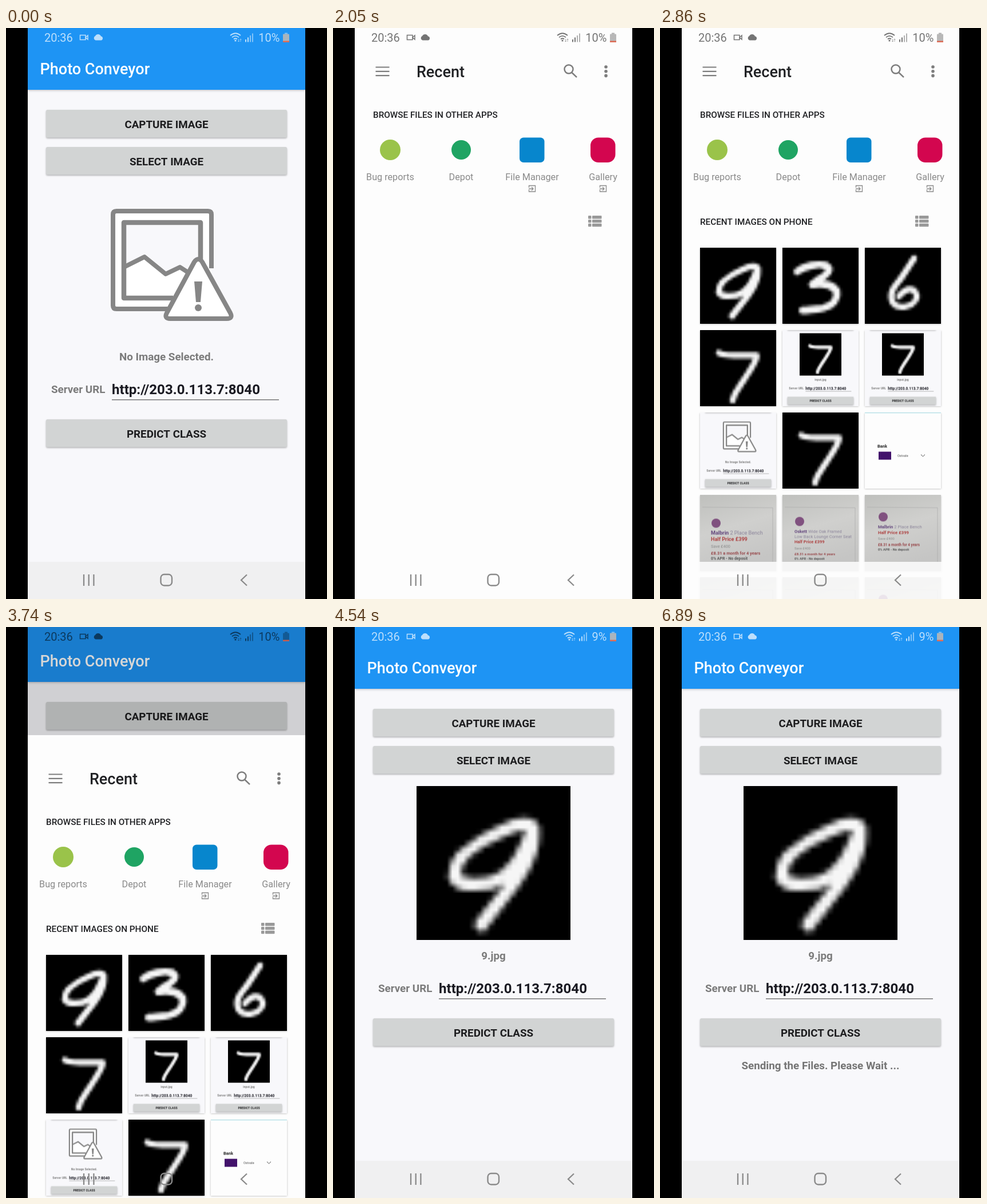
An HTML page with a canvas for the animation above (8 s loop, 561x998 px).

```html
<!DOCTYPE html>
<html lang="en">
<head>
<meta charset="utf-8">
<title>Photo upload demo</title>
<style>
  html, body { margin: 0; width: 100%; height: 100%; overflow: hidden; background: #000; }
  canvas { display: block; }
</style>
</head>
<body>
<canvas id="stage" width="561" height="998"></canvas>
<script>
const LOOP = 8000, STEP = 73.2;
const LEFT = 38, WIDTH = 485, HEIGHT = 998, NAV_TOP = 933;
const CELL = 133, PITCH = 144, GRID_TOP = 383.5;
const SERVER = 'http://203.0.113.7:8040';
const DIGITS = {
  9: ['M21.2 8.5C21.6 6.2 19 6.6 15.3 8.2C9.5 10.8 6.5 13.7 6.9 16.4C7.5 18.4 13 18.3 15.8 16.5C18 14.8 20 11 21 8C22 11.5 20 14 17.5 17.8L11.7 25.2', 2.3],
  3: ['M5.5 8.8C8 6.8 13 5.6 16 6.6C18.6 8 16 10.4 13 12L11 13.6C14 13.1 18.2 13.4 19.9 16C20.6 19 18.5 21.4 15 22.3C12 23 10 22.8 7.4 23.2', 2.7],
  6: ['M18.1 4C16 7 14 11 11.6 13.5C9.5 16 9.3 18.5 10.3 20.4C12 23 17 22 18.6 19.5C20 17 18 15 16 15.4C14.5 15.8 13.5 17 12.5 18', 2.2],
  7: ['M6.9 8.4C10 9.8 15 9.2 20.8 9.4C21 11.5 18.5 14.5 17 17C14.5 21 12.5 23 11.9 26', 2.2]
};

let g = document.getElementById('stage').getContext('2d');

const clamp = v => Math.min(1, Math.max(0, v));
const ramp = (t, start, length) => clamp((t - start) / length);
const smooth = p => p * p * (3 - 2 * p);

function scoped(draw) {
  g.save();
  draw();
  g.restore();
}

function layer(width, height, draw) {
  const canvas = document.createElement('canvas');
  canvas.width = width;
  canvas.height = height;
  const outer = g;
  g = canvas.getContext('2d');
  draw();
  g = outer;
  return canvas;
}

function rect(x, y, w, h, color, radius = 0) {
  g.fillStyle = color;
  g.beginPath();
  g.roundRect(x, y, w, h, radius);
  g.fill();
}

function disc(x, y, r, color) {
  g.fillStyle = color;
  g.beginPath();
  g.arc(x, y, r, 0, 7);
  g.fill();
}

function line(path, color, width, fill) {
  const shape = new Path2D(path);
  if (fill) {
    g.fillStyle = fill;
    g.fill(shape);
  }
  g.strokeStyle = color;
  g.lineWidth = width;
  g.stroke(shape);
}

function fillPath(path, color) {
  g.fillStyle = color;
  g.fill(new Path2D(path), 'evenodd');
}

function text(str, x, y, size, color, weight = 400, align = 'left') {
  g.font = `${weight} ${size}px Roboto, sans-serif`;
  g.fillStyle = color;
  g.textAlign = align;
  g.fillText(str, x, y);
}

function shadow(color, blur, dy) {
  g.shadowColor = color;
  g.shadowBlur = blur;
  g.shadowOffsetY = dy;
}

// Handwritten digits: 28-pixel bitmaps, scaled up with smoothing.
const bitmaps = {};
for (const [digit, [path, width]] of Object.entries(DIGITS)) {
  bitmaps[digit] = layer(28, 28, () => {
    rect(0, 0, 28, 28, '#000');
    g.lineCap = g.lineJoin = 'round';
    line(path, '#f6f6f6', width);
  });
}

function missingImage() {
  const gray = '#868686';
  g.lineJoin = 'round';
  rect(187, 320, 172, 171, '#fff', 6);
  line('M359 420V326Q359 320 353 320H193Q187 320 187 326V485Q187 491 193 491H282', gray, 8);
  rect(206, 340, 134, 132, '#f8f8fb');
  fillPath('M207 417L242 400L279 430L304 418L320 428V472H207Z', '#fff');
  line('M340 405V340H206V472H292', gray, 8.5);
  line('M208 417L242 400L279 430L304 418L318 427', gray, 8);
  line('M329 409Q336 399 343 409L392 498Q397 508 386 508H287Q276 508 281 498Z', gray, 8, '#fff');
  fillPath('M329 443H343L340 479H332Z', gray);
  disc(336, 489, 6, gray);
}

function button(y, label, press = { grow: 0, fade: 0 }) {
  scoped(() => {
    shadow('rgba(0,0,0,.28)', 3 + 4 * press.fade, 1.5);
    rect(70, y, 421, 48.5, '#d2d4d4', 2.7);
  });
  if (press.fade > 0) scoped(() => {
    g.beginPath();
    g.roundRect(70, y, 421, 48.5, 2.7);
    g.clip();
    disc(280.5, y + 24.5, 215 * press.grow, `rgba(0,0,0,${.13 * press.fade})`);
  });
  text(label, 280.5, y + 31.5, 18.8, '#1c1c1e', 700, 'center');
}

function uploader({ digit, label, select, predict, sent }) {
  rect(LEFT, 0, WIDTH, HEIGHT + 30, '#f8f8fb');
  rect(LEFT, NAV_TOP, WIDTH, 95, '#f0f0f1');
  scoped(() => {
    shadow('rgba(0,0,0,.25)', 4, 1);
    rect(LEFT, -30, WIDTH, 138, '#1e94f4');
  });
  text('Photo Conveyor', 59.5, 80.5, 27, '#fff', 500);
  button(143, 'CAPTURE IMAGE');
  button(208, 'SELECT IMAGE', select);
  if (digit) g.drawImage(bitmaps[digit], 146, 278, 269, 269);
  else scoped(missingImage);
  text(label, 280.5, 581, 18.8, '#7b7b7b', 700, 'center');
  text('Server URL', 79, 638, 18.8, '#7b7b7b', 700);
  text(SERVER, 185, 640, 24.1, '#1a1a22', 700);
  rect(185, 649, 292, 1.4, '#777');
  button(684, 'PREDICT CLASS', predict);
  if (sent) text('Sending the Files. Please Wait ...', 280.5, 773, 18.8, '#757575', 700, 'center');
}

const thumb = draw => layer(CELL, CELL, draw);
const digitThumb = digit => thumb(() => g.drawImage(bitmaps[digit], 0, 0, CELL, CELL));

const screenThumb = (digit, label) => thumb(() => {
  const scale = CELL / WIDTH;
  g.scale(scale, scale);
  g.translate(-LEFT, -257);
  uploader({ digit, label });
});

const bankThumb = () => thumb(() => {
  rect(0, 0, CELL, CELL, '#fdfdfd');
  rect(0, 0, CELL, 1.3, '#7fcbd8');
  text('Bank', 22, 62, 7.5, '#222', 700);
  rect(24, 69, 22, 14, '#42126b');
  text('Ostvale', 57, 78, 5.6, '#444');
  line('M98 74L101.500 77.500L105 74', '#444', 1);
});

const labelPhoto = (x, y, size, name, rest, second) => thumb(() => {
  const tone = g.createLinearGradient(0, 0, 40, CELL);
  tone.addColorStop(0, '#bfc0bd');
  tone.addColorStop(.5, '#d0d0ce');
  tone.addColorStop(1, '#c5c5c4');
  rect(0, 0, CELL, CELL, tone);
  line(`M4 22L${CELL - 6} 23V${CELL - 15}`, '#aaa', .7);
  disc(x + 9, y - 20, 8, '#80517f');
  text(name, x, y, size, '#61447b', 700);
  const nameWidth = g.measureText(name + ' ').width;
  text(rest, x + nameWidth, y, size, '#8b849a');
  if (second) text(second, x, y += size + 1, size, '#8b849a');
  text('Half Price £399', x, y += size + 2, size, '#ad4140', 700);
  text('Save £400', x, y += size + 3, size * .8, '#888');
  text('£8.31 a month for 4 years', x, y += size + 3, size * .82, '#98484b', 700);
  text('0% APR - No deposit', x, y + size, size * .76, '#555', 700);
});

const photos = [
  labelPhoto(19, 70, 9.1, 'Malbrin', '2 Place Bench'),
  labelPhoto(21, 67, 7.5, 'Oskett', 'Wide Oak Framed', 'Low Back Lounge Corner Seat'),
  labelPhoto(23, 59, 7.7, 'Malbrin', '2 Place Bench')
];
const thumbs = [
  digitThumb(9), digitThumb(3), digitThumb(6),
  digitThumb(7), screenThumb(7, 'input.jpg'), screenThumb(7, 'input.jpg'),
  screenThumb(null, 'No Image Selected.'), digitThumb(7), bankThumb(),
  ...photos, ...photos
];

// The mountains are cut out, so the card shows through.
function placeholder(x, y) {
  scoped(() => {
    g.translate(x, y);
    fillPath('M4 0H37Q41 0 41 4V37Q41 41 37 41H4Q0 41 0 37V4Q0 0 4 0ZM6 33l7.500 -9l5 6l7.500 -10l9.500 13z', '#db4a40');
  });
}

function grid(t) {
  thumbs.forEach((image, i) => {
    const row = Math.floor(i / 3);
    const x = 70 + PITCH * (i % 3), y = GRID_TOP + PITCH * row;
    const shown = ramp(t, row < 3 ? 2168 : 2308, 400);
    scoped(() => {
      shadow('rgba(0,0,0,.28)', 3, 1);
      rect(x, y, CELL, CELL, '#fdfdfd');
    });
    g.globalAlpha = shown;
    g.drawImage(image, x, y);
    g.globalAlpha = 1 - shown ** 1.5;
    placeholder(x + 46, y + 46.5);
    g.globalAlpha = 1;
  });
  const tap = ramp(t, 3400, 150) * (1 - ramp(t, 3550, 150));
  rect(70, GRID_TOP, CELL, CELL, `rgba(150,150,150,${.3 * tap})`);
}

function apps() {
  const gray = '#8a8a8a';
  text('BROWSE FILES IN OTHER APPS', 70, 157, 15.3, '#202124', 500);
  disc(100, 213, 18, '#9ac34a');
  disc(224, 213, 17, '#1fa463');
  rect(326, 191.5, 43.5, 43.5, '#0786cd', 7);
  rect(450, 191.5, 43.5, 43.5, '#d3064f', 14);
  ['Bug reports', 'Depot', 'File Manager', 'Gallery'].forEach((name, i) => {
    const x = 100 + 124 * i;
    text(name, x, 265.5, 16.2, gray, 400, 'center');
    if (i > 1) line(`M${x - 5.5} 279v-3.500h11v10.500h-11v-3.500M${x - 6} 281h8m-3 -3l3 3l-3 3`, gray, 1.3);
  });
  for (let y = 328; y < 345; y += 6.9) {
    rect(446, y, 5.5, 5.4, '#999', 1);
    rect(453, y, 16.5, 5.4, '#999', 1);
  }
}

function picker(t) {
  const gray = '#7d7d7d';
  rect(LEFT, 0, WIDTH, HEIGHT, '#fdfdfd');
  line('M74.500 68.500h24m-24 7.300h24m-24 7.300h24', gray, 2.2);
  text('Recent', 146, 86, 27, '#202124', 500);
  line('M419.500 72a7.500 7.500 0 1 1 -15 0a7.500 7.500 0 1 1 15 0M417 77.500l9 8.700', gray, 2.5);
  for (const y of [68, 75.7, 83.4]) disc(477, y, 2.8, gray);
  if (t >= 2040) apps();
  if (t >= 2110) {
    text('RECENT IMAGES ON PHONE', 70, 343.5, 15.3, '#202124', 500);
    grid(t);
  }
  rect(LEFT, NAV_TOP, WIDTH, 65, 'rgba(253,253,253,.86)');
}

function statusBar(light, low) {
  const color = light ? 'rgba(255,255,255,.7)' : 'rgba(0,0,0,.54)';
  const faint = light ? 'rgba(255,255,255,.45)' : 'rgba(0,0,0,.3)';
  text('20:36', 67, 24, 20, color);
  line('M129.500 12.500h9.500v8h-9.500zM139 16.500l4 -3.500v7z', color, 1.5);
  fillPath('M156.500 21.500a4 4 0 0 1 -.5 -7.500a5.500 5.500 0 0 1 10 .5a3.600 3.600 0 0 1 .5 7z', color);
  scoped(() => {
    g.translate(low ? 12 : 0, 0);
    line('M392 13Q401 5.500 410 13M395 16.300Q401 11.300 407 16.300M398 19.500Q401 17 404 19.500', color, 1.7);
    disc(401, 22, 1.6, color);
    line('M406.500 19v5m-1.500 -1.500l1.500 1.500l1.500 -1.500M410 24v-5m-1.500 1.500l1.500 -1.500l1.500 1.500', faint, 1);
    for (let i = 0; i < 4; i++) rect(418 + 4 * i, 20 - 3.5 * i, 2, 4.5 + 3.5 * i, i < 2 ? color : faint);
  });
  text(low ? '9%' : '10%', 478.5, 24, 20, color, 400, 'right');
  rect(487, 8.5, 5, 2, faint);
  rect(484, 10.5, 11, 14.5, light ? '#a9b4bd' : 'rgba(0,0,0,.27)', 1);
  rect(484, 22.5, 11, 2.5, 'rgba(228,96,70,.85)');
}

function navIcons() {
  line('M136 955v20m8.700 -20v20m8.700 -20v20', '#8a8a8a', 2.3);
  g.strokeStyle = '#8a8a8a';
  g.lineWidth = 2.4;
  g.beginPath();
  g.roundRect(270.5, 955, 19.5, 19.5, 6);
  g.stroke();
  line('M421 955.500L411 965L421 974.500', '#8a8a8a', 2.3);
}

function render(t) {
  const opening = ramp(t, 1180, 280);
  const closing = ramp(t, 3577.5, 560);
  const offset = Math.round(HEIGHT * (closing > 0 ? smooth(closing) : (1 - opening) ** 3));
  const pickerOpen = opening > 0 && closing < 1;
  const picked = closing > 0;
  const low = t >= 4240;
  const parallax = !pickerOpen ? 0 : picked ? -23 * (1 - closing) ** 2 : -20 * opening;

  g.fillStyle = '#000';
  g.fillRect(0, 0, 561, HEIGHT);
  scoped(() => {
    g.beginPath();
    g.rect(LEFT, 0, WIDTH, HEIGHT);
    g.clip();
    scoped(() => {
      g.translate(0, Math.round(parallax));
      uploader({
        digit: picked && 9,
        label: picked ? '9.jpg' : 'No Image Selected.',
        select: { grow: ramp(t, 10, 280), fade: ramp(t, 0, 70) * (1 - ramp(t, 440, 440)) },
        predict: { grow: ramp(t, 6160, 290), fade: ramp(t, 6160, 70) * (1 - ramp(t, 6440, 440)) },
        sent: t >= 6430
      });
    });
    if (pickerOpen) {
      rect(LEFT, 0, WIDTH, HEIGHT, `rgba(0,0,0,${.2 * (1 - offset / HEIGHT)})`);
      g.translate(0, offset);
      picker(t);
    }
  });
  statusBar(!pickerOpen, low);
  navIcons();
}

function tick(now) {
  render(Math.floor((now % LOOP) / STEP) * STEP);
  requestAnimationFrame(tick);
}
requestAnimationFrame(tick);
</script>
</body>
</html>
```
